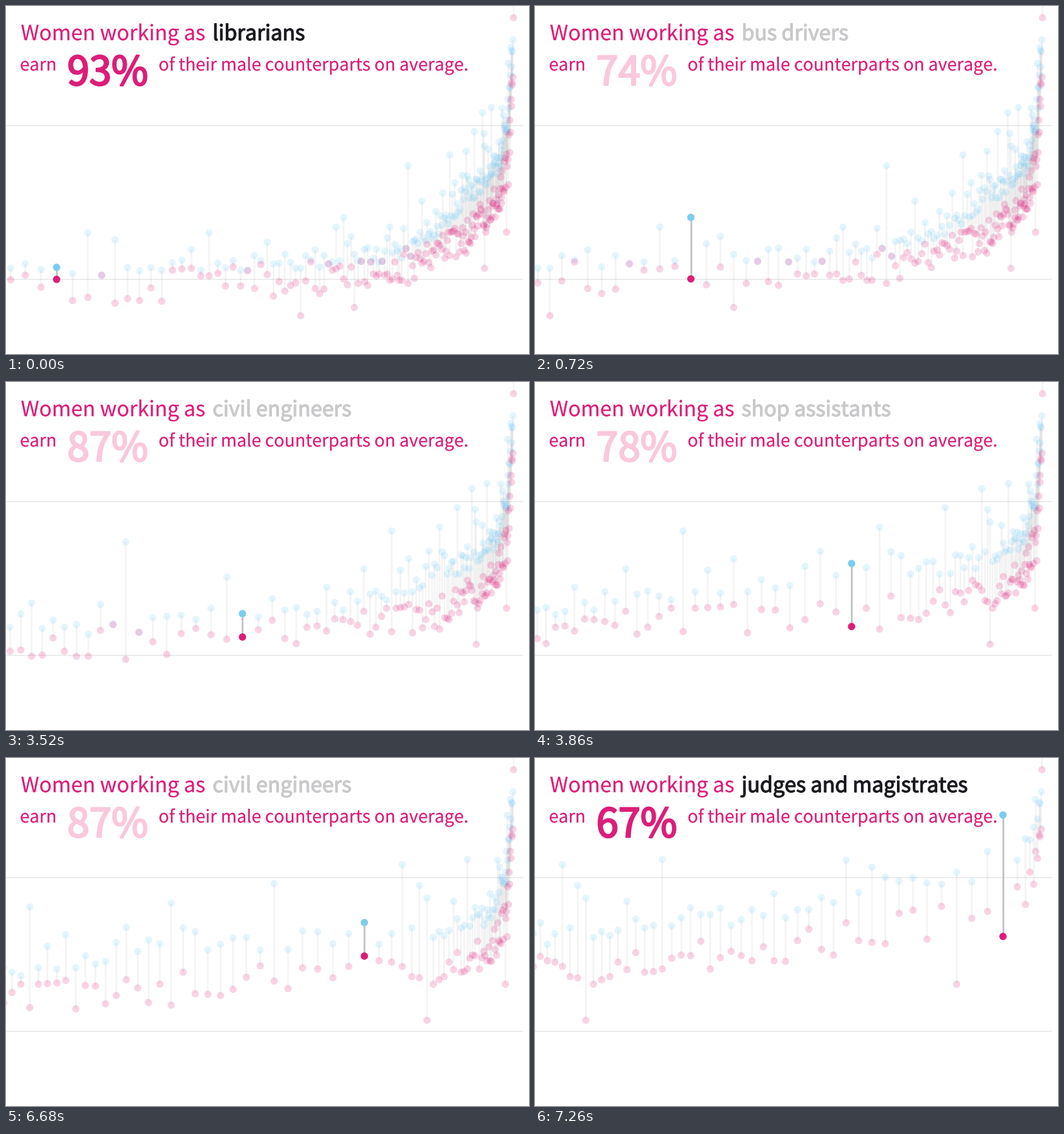
A matplotlib script that plays this animation: 828 by 550 pixels, repeating every 8000 ms.

```python
import matplotlib.pyplot as plt
import numpy as np
from matplotlib.animation import FuncAnimation
from matplotlib.collections import LineCollection
from matplotlib.patches import PathPatch
from matplotlib.path import Path
from matplotlib.textpath import TextPath

W, H, DPI = 828, 550, 64
STEP, LOOP = 20, 8000
FONT = {"family": "Noto Sans CJK JP"}
PINK, BLUE, INK = "#db1e78", "#7ccdee", "#1b1a1f"
PALE_PINK, PALE_INK = "#f9c8dc", "#c9c8ca"
DOT = 11.5

# Fisheye axis: evenly spaced jobs, magnified around the pointer
COUNT, SPACING, ORIGIN = 170, 4.285, 67.15
LEFT, RIGHT, ZOOM = -1100, 805, 5

POINTER = [80, 368, 560.3, 750]
MOVES = [(500, 1020), (3520, 4180), (6680, 7260)]
STOPS = [("librarians", 93), ("accountants", 73),
         ("physical therapists", 87), ("judges and magistrates", 67)]
PASSING = [("civil engineers", 87), ("shop assistants", 78),
           ("web designers", 81), ("bus drivers", 74)]
JOB_AT, PERCENT_AT = (327, 54, 33), (97, 125, 63)

# Pay curves: (job rank, men's y, women's y)
TREND = [(0, 420, 450), (62, 392, 410), (100, 308, 365),
         (140, 258, 308), (158, 185, 245), (169, 40, 110)]

# Picked jobs and the widest gaps: rank -> (men's y, women's y)
KEY_JOBS = {3: (413, 432), 30: (414, 489), 39: (402, 411), 43: (392, 476),
            63: (252, 438), 70: (308, 406), 71: (366, 403), 102: (229, 390),
            115: (277, 329), 116: (260, 313), 119: (168, 329),
            122: (221, 414), 156: (180, 357), 159: (90, 282),
            169: (-40, 18)}


def px(width):
    return width * 72 / DPI


def make_jobs():
    """Men's pay spikes upwards from its curve, women's scatters around it."""
    rng = np.random.default_rng(7)
    rank = np.arange(COUNT)
    knots, men, women = np.transpose(TREND)
    men = np.interp(rank, knots, men) + 8 - rng.exponential(20, COUNT)
    women = np.interp(rank, knots, women) + rng.uniform(-28, 28, COUNT)
    women = np.maximum(women, men)
    for job, pay in KEY_JOBS.items():
        men[job], women[job] = pay
    return ORIGIN + SPACING * rank, men, women


def fisheye(x, focus):
    offset = x - focus
    span = np.where(offset < 0, focus - LEFT, RIGHT - focus)
    return focus + (ZOOM + 1) * offset / (1 + ZOOM * np.abs(offset) / span)


def ease(u):
    return 1 - (1 - u ** 1.4) ** 2.03


def state(t):
    """Pointer x, (job, percent) and whether the pointer is moving."""
    stop = 0
    for i, (start, end) in enumerate(MOVES):
        if start <= t < end:
            u = (t - start + STEP) / (end - start + STEP)
            focus = POINTER[i] + (POINTER[i + 1] - POINTER[i]) * ease(u)
            label = PASSING[(t - start) // (3 * STEP) % len(PASSING)]
            return focus, label, True
        if t >= end:
            stop = i + 1
    return POINTER[stop], STOPS[stop], False


def text_path(text, x, y, size):
    glyphs = TextPath((0, 0), text, size=size, prop=FONT)
    return Path(glyphs.vertices * [1, -1] + [x, y], glyphs.codes)


def add_text(text, place, color=PINK, weight=0.25):
    patch = PathPatch(text_path(text, *place), color=color, lw=px(weight),
                      joinstyle="round", zorder=6)
    return ax.add_patch(patch)


def add_dots(count, color, alpha, zorder):
    origin = np.zeros(count)
    return ax.scatter(origin, origin, s=px(DOT) ** 2, c=color, alpha=alpha,
                      linewidths=0, zorder=zorder)


fig = plt.figure(figsize=(W / DPI, H / DPI), dpi=DPI, facecolor="white")
ax = fig.add_axes([0, 0, 1, 1])
ax.axis("off")

for y in (189, 432):
    ax.plot([0, 818], [y, y], color="#ececec", lw=px(2), zorder=0)

base_x, men, women = make_jobs()
stems = LineCollection([], colors=[(0, 0, 0, 0.04)], linewidths=px(3),
                       capstyle="butt", zorder=1)
ax.add_collection(stems, autolim=False)
men_dots = add_dots(COUNT, "#62c2f0", 0.16, 2)
women_dots = add_dots(COUNT, PINK, 0.19, 3)
picked_stem, = ax.plot([], [], color="#c2c2c5", lw=px(2.8),
                       solid_capstyle="butt", zorder=4)
picked_dots = add_dots(2, [BLUE, PINK], 1, 5)

add_text("Women working as", (23.5, 54, 33))
add_text("earn", (22, 102, 27.5))
add_text("of their male counterparts on average.", (241.5, 102, 27.5))
job_text = add_text(STOPS[0][0], JOB_AT, INK, 1.2)
percent_text = add_text(f"{STOPS[0][1]}%", PERCENT_AT, PINK, 2.6)

ax.set_xlim(0, W)
ax.set_ylim(H, 0)


def update(frame):
    focus, (job, percent), moving = state(frame * STEP)
    x = fisheye(base_x, focus)
    top, bottom = np.column_stack([x, men]), np.column_stack([x, women])
    stems.set_segments(np.stack([top, bottom], axis=1))
    men_dots.set_offsets(top)
    women_dots.set_offsets(bottom)

    picked = int((focus - ORIGIN) / SPACING + 0.4)
    pair = np.array([top[picked], bottom[picked]])
    picked_stem.set_data(pair[:, 0], pair[:, 1])
    picked_dots.set_offsets(pair)

    job_text.set_path(text_path(job, *JOB_AT))
    job_text.set_color(PALE_INK if moving else INK)
    percent_text.set_path(text_path(f"{percent}%", *PERCENT_AT))
    percent_text.set_color(PALE_PINK if moving else PINK)
    return ()


anim = FuncAnimation(fig, update, frames=LOOP // STEP, interval=STEP,
                     init_func=lambda: update(0), repeat=True,
                     repeat_delay=0, blit=False)
plt.show()
```
